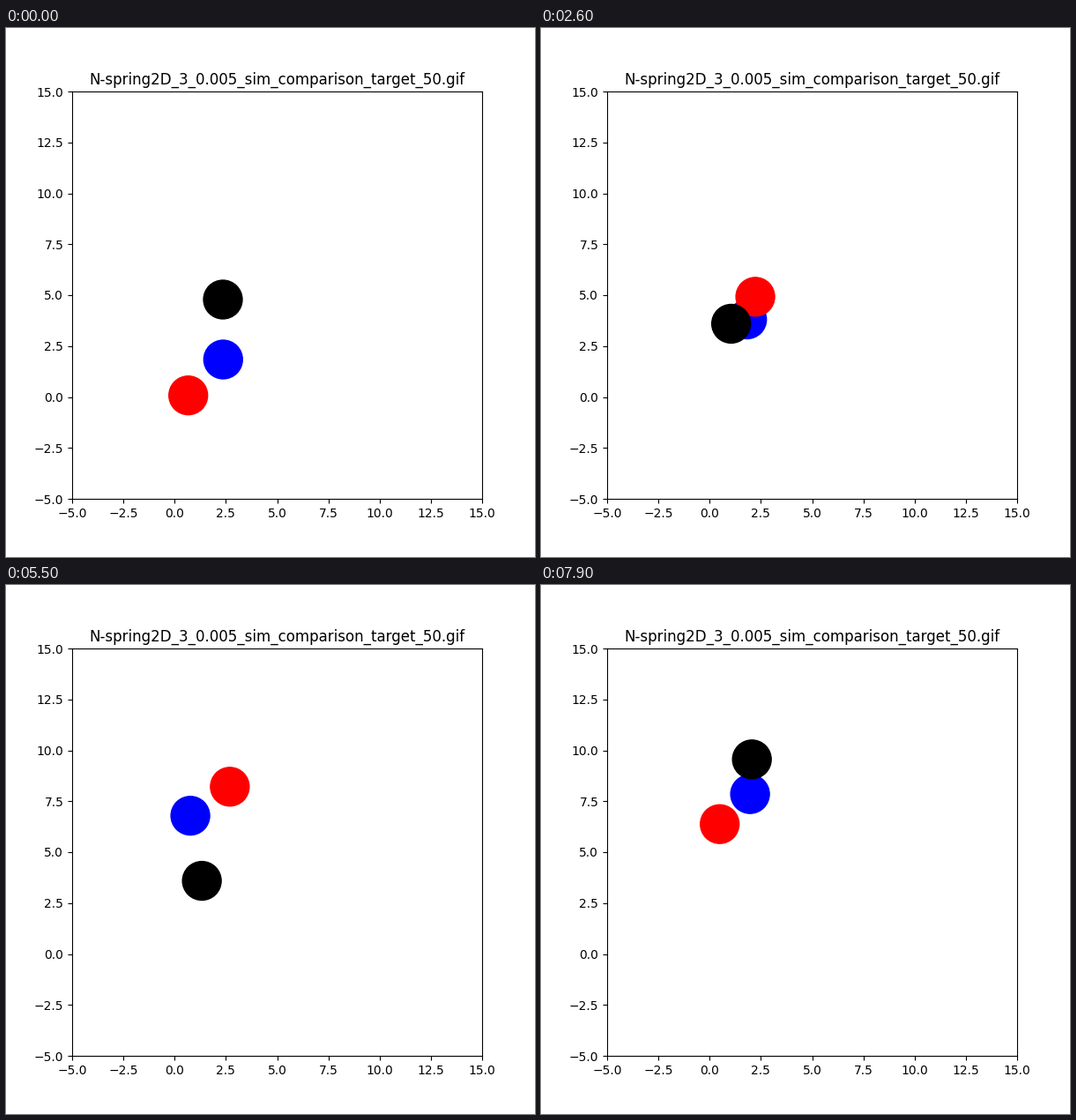
Recreate the animation shown at these times as a matplotlib script. Size 600 by 600 pixels, loop 8000 ms.

```python
import numpy as np
import matplotlib.pyplot as plt
from matplotlib.animation import FuncAnimation

FRAMES, STEP = 80, 100        # count, milliseconds
STIFFNESS, REST = 1.025, 0.236
SUBSTEPS = 20

# Starting state of the blue, red and black ball, all of unit mass.
START = np.array([[2.368, 1.840], [0.665, 0.078], [2.355, 4.784]])
SPEED = np.array([[-0.700, 1.496], [-0.270, 0.470], [0.861, 0.196]])


def pull(pos):
    """Sum of the spring forces between every pair of balls."""
    gap = pos[None] - pos[:, None]
    dist = np.linalg.norm(gap, axis=2, keepdims=True)
    dist[dist == 0] = 1
    return (STIFFNESS * (1 - REST / dist) * gap).sum(axis=1)


def simulate():
    """Positions for every frame, by velocity Verlet."""
    dt = STEP / 1000 / SUBSTEPS
    pos, vel = START, SPEED
    path = [pos]
    for _ in range(FRAMES - 1):
        for _ in range(SUBSTEPS):
            half = vel + pull(pos) * dt / 2
            pos = pos + half * dt
            vel = half + pull(pos) * dt / 2
        path.append(pos)
    return path


path = simulate()
fig, ax = plt.subplots(figsize=(6, 6), dpi=100)
ax.set_xlim(-5, 15)
ax.set_ylim(-5, 15)
ax.set_title("N-spring2D_3_0.005_sim_comparison_target_50.gif")
balls = ax.scatter(*START.T, s=1000, c=["blue", "red", "black"])


def update(i):
    balls.set_offsets(path[i])
    return balls,


anim = FuncAnimation(fig, update, frames=FRAMES, interval=STEP,
                     repeat=True, repeat_delay=0)
plt.show()
```
